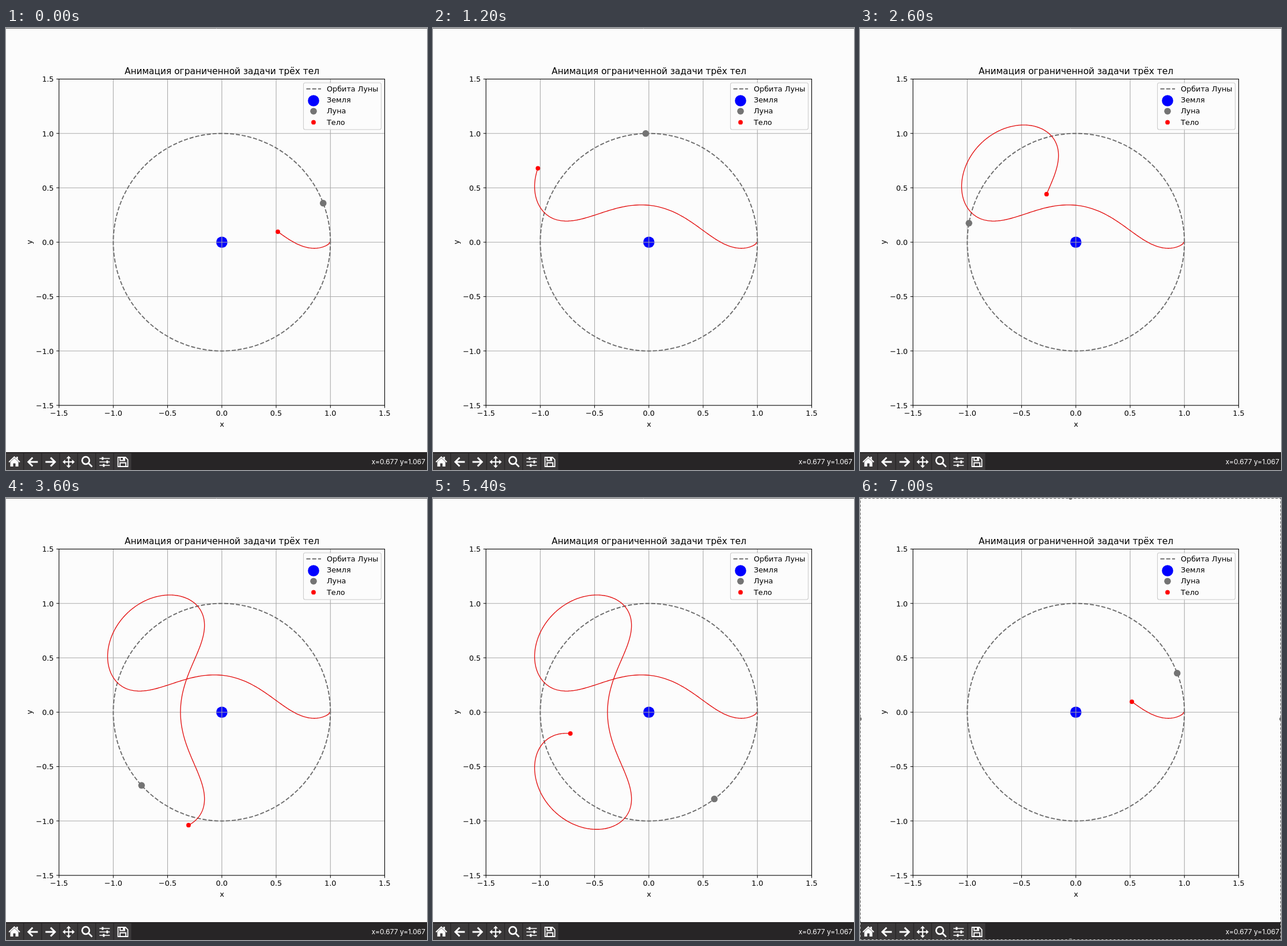
Write an HTML page with a canvas that moves like this. It is 731 by 766 pixels and loops after 7100 ms.

```html
<!DOCTYPE html>
<html lang="ru">
<head>
<meta charset="utf-8">
<style>
html, body { margin: 0; width: 100%; height: 100%; overflow: hidden; background: #fcfcfc; }
canvas { display: block; }
</style>
</head>
<body>
<canvas id="stage" width="731" height="766"></canvas>
<script>
const ctx = document.getElementById('stage').getContext('2d');
const CX = 374.8, CY = 371.2, UNIT = 188.5;
const LEFT = 92, RIGHT = 657.5, TOP = 88.5, BOTTOM = 654;
const GRAY = '#6c6c6c', RED = '#e31010';
const px = x => CX + x * UNIT, py = y => CY - y * UNIT;

// Periodic Arenstorf orbit in the rotating frame of the two large bodies.
const MU = 0.012277471, PERIOD = 11.124340337266085, SAMPLES = 1000, SUBSTEPS = 400;

function derive([x, y, vx, vy]) {
  const a = x + MU, b = x - 1 + MU;
  const e = (1 - MU) / Math.pow(a * a + y * y, 1.5);
  const m = MU / Math.pow(b * b + y * y, 1.5);
  return [vx, vy, x + 2 * vy - e * a - m * b, y - 2 * vx - (e + m) * y];
}

function rungeKutta(s, h) {
  const shift = (k, f) => [s[0] + f * k[0], s[1] + f * k[1], s[2] + f * k[2], s[3] + f * k[3]];
  const k1 = derive(s), k2 = derive(shift(k1, h / 2));
  const k3 = derive(shift(k2, h / 2)), k4 = derive(shift(k3, h));
  return s.map((v, i) => v + h / 6 * (k1[i] + 2 * k2[i] + 2 * k3[i] + k4[i]));
}

// The second half mirrors the first across the x axis.
function computeOrbit() {
  const h = PERIOD / SAMPLES / SUBSTEPS, points = [];
  let state = [0.994, 0, 0, -2.0317326295573368];
  for (let i = 0; i <= SAMPLES / 2; i++) {
    points[i] = [state[0], state[1]];
    points[SAMPLES - i] = [state[0], -state[1]];
    for (let j = 0; j < SUBSTEPS; j++) state = rungeKutta(state, h);
  }
  return points;
}
const orbit = computeOrbit();

function line(points, color, width = 1, dash = []) {
  ctx.beginPath();
  points.forEach(([x, y]) => ctx.lineTo(x, y));
  ctx.strokeStyle = color;
  ctx.lineWidth = width;
  ctx.setLineDash(dash);
  ctx.stroke();
  ctx.setLineDash([]);
}

function disc(x, y, r, color) {
  ctx.beginPath();
  ctx.arc(x, y, r, 0, 7);
  ctx.fillStyle = color;
  ctx.fill();
}

function text(str, x, y, align = 'center', size = 12.8, color = '#000', family = '"DejaVu Sans", sans-serif') {
  ctx.font = `${size}px ${family}`;
  ctx.textAlign = align;
  ctx.fillStyle = color;
  ctx.fillText(str, x, y);
}

function drawAxes() {
  disc(px(0), py(0), 9.8, '#00f');
  for (let v = -1.5; v <= 1.5; v += 0.5) {
    const x = px(v), y = py(v), label = v.toFixed(1).replace('-', '\u2212');
    if (Math.abs(v) < 1.5) {
      line([[x, TOP], [x, BOTTOM]], '#aaa', 1.1);
      line([[LEFT, y], [RIGHT, y]], '#aaa', 1.1);
    }
    line([[x, BOTTOM], [x, BOTTOM + 4.5]], '#000');
    line([[LEFT, y], [LEFT - 4.5, y]], '#000');
    text(label, x, 672.3);
    text(label, 83, y + 4.8, 'right');
  }
  ctx.beginPath();
  ctx.arc(CX, CY, UNIT, 0, -2 * Math.PI, true);
  ctx.strokeStyle = GRAY;
  ctx.lineWidth = 1.9;
  ctx.setLineDash([7.1, 3.07]);
  ctx.stroke();
  ctx.setLineDash([]);
}

function drawLabels() {
  ctx.strokeStyle = '#000';
  ctx.lineWidth = 1.1;
  ctx.strokeRect(LEFT, TOP, RIGHT - LEFT, BOTTOM - TOP);
  text('Анимация ограниченной задачи трёх тел', 375, 80, 'center', 15.4);
  text('x', 375, 691);
  ctx.save();
  ctx.translate(44.5, 371);
  ctx.rotate(-Math.PI / 2);
  text('y', 0, 0);
  ctx.restore();

  ctx.beginPath();
  ctx.roundRect(516.5, 95, 135, 81, 3);
  ctx.fillStyle = 'rgba(253,253,253,.8)';
  ctx.fill();
  ctx.strokeStyle = '#ccc';
  ctx.stroke();
  line([[521.5, 105.5], [547, 105.5]], GRAY, 1.9, [7.1, 3.07]);
  disc(534, 126, 9.8, '#00f');
  disc(534, 144.2, 5.8, '#747474');
  disc(534, 163.4, 3.9, '#f00');
  ['Орбита Луны', 'Земля', 'Луна', 'Тело'].forEach((s, i) => text(s, 557, 110 + i * 19.2, 'left'));
}

const icons = [
  { fill: 'M4.5 14.5 14.5 5 18 8.3V6h2.6v4.7l4 3.8-1.3 1.4-8.8-8.2-8.8 8.2ZM7.5 15l7-6.5 7 6.5v8h-5v-5.5h-4V23h-5Z' },
  { stroke: 'M24 15H8M15 7.5 7.5 15l7.5 7.5', width: 3 },
  { stroke: 'M6 15h16M15 7.5 22.5 15 15 22.5', width: 3 },
  { stroke: 'M15 7v16M7 15h16', width: 2, fill: 'M15 4.5l4 4.5h-8ZM15 25.5l4-4.5h-8ZM4.5 15 9 11v8ZM25.5 15 21 11v8Z' },
  { stroke: 'M19.8 12.5a6.3 6.3 0 1 1-12.6 0a6.3 6.3 0 1 1 12.6 0M18 17l6.5 6.5', width: 2.7 },
  { stroke: 'M6 9h18M6 15h18M6 21h18', width: 1.7, fill: 'M10 6.5h3v5h-3ZM18 12.5h3v5h-3ZM12 18.5h3v5h-3Z' },
  { stroke: 'M7 7h13l4 4v12H7ZM10.5 7v5.5h8V7M10.5 23v-6.5h10V23', width: 1.8, fill: 'M15.5 7.5h2v4h-2Z' }
];

function drawToolbar() {
  ctx.fillStyle = '#272526';
  ctx.fillRect(0, 735, 731, 31);
  icons.forEach((icon, i) => {
    ctx.save();
    ctx.translate(i * 31.25, 737);
    ctx.fillStyle = '#3b393a';
    ctx.fillRect(0, 0, 30, 29);
    ctx.fillStyle = ctx.strokeStyle = '#fff';
    ctx.lineWidth = icon.width;
    if (icon.stroke) ctx.stroke(new Path2D(icon.stroke));
    if (icon.fill) ctx.fill(new Path2D(icon.fill));
    ctx.restore();
  });
  text('x=0.677 y=1.067', 728, 756, 'right', 12, '#fff', 'Inter, sans-serif');
}

function drawSelection() {
  line([[0.5, 0.5], [730.5, 0.5], [730.5, 765.5], [0.5, 765.5], [0.5, 0.5]], '#ddd');
  line([[0.5, 0.5], [730.5, 0.5], [730.5, 765.5], [0.5, 765.5], [0.5, 0.5]], '#555', 1, [4, 3]);
  [[365.5, 0], [0, 383], [731, 383], [365.5, 766]].forEach(([x, y]) => disc(x, y, 3, '#777'));
}

// Moon angle in degrees; playback slows down as the trail grows.
function moonAngle(step) {
  const u = (step < 67 ? step : step - 70) / 18;
  return 21.04 + 104.8 * u - 4.17 * u * (u - 1) - 0.5533 * u * (u - 1) * (u - 2);
}

function drawBodies(degrees) {
  const at = degrees / 360 * SAMPLES, last = Math.floor(at), f = at - last;
  const [a, b] = [orbit[last], orbit[last + 1]];
  const body = [a[0] + (b[0] - a[0]) * f, a[1] + (b[1] - a[1]) * f];
  const trail = [...orbit.slice(0, last + 1), body].map(([x, y]) => [px(x), py(y)]);
  const angle = degrees * Math.PI / 180;
  line(trail, RED, 1.35);
  disc(px(Math.cos(angle)), py(Math.sin(angle)), 5.8, '#747474');
  disc(px(body[0]), py(body[1]), 3.9, '#f00');
}

function render() {
  const step = Math.floor(performance.now() % 7100 / 100);
  ctx.fillStyle = '#fcfcfc';
  ctx.fillRect(0, 0, 731, 766);
  ctx.lineJoin = 'round';
  drawAxes();
  drawBodies(moonAngle(step));
  ctx.lineJoin = 'miter';
  drawLabels();
  drawToolbar();
  if (step < 63) line([[0, 0.5], [731, 0.5]], '#555');
  else drawSelection();
  requestAnimationFrame(render);
}
render();
</script>
</body>
</html>
```
